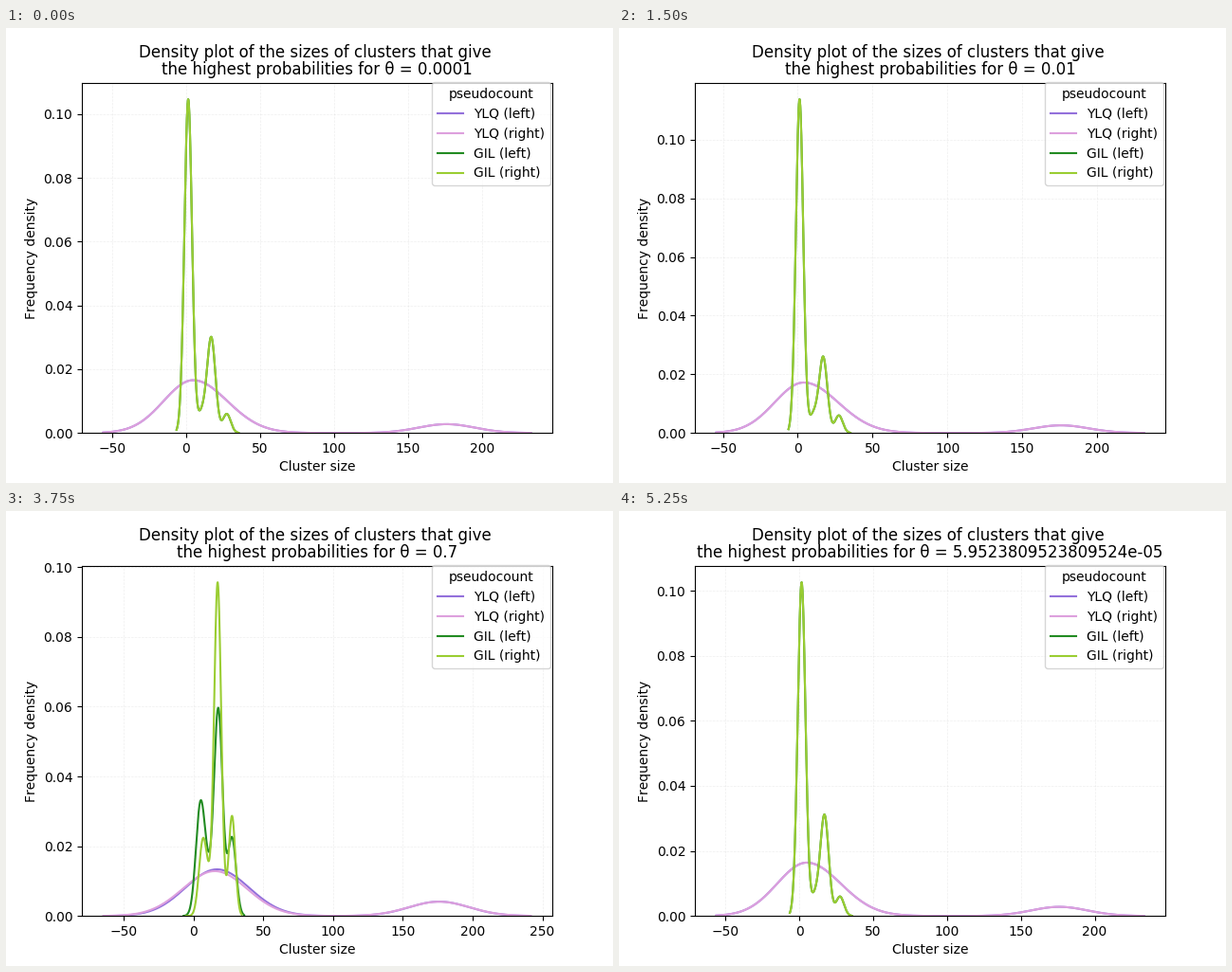
Write a matplotlib script that moves like this. It is 640 by 480 pixels and loops after 6 s.

```python
import numpy as np
import matplotlib.pyplot as plt
from matplotlib.animation import FuncAnimation

plt.rcParams["text.kerning_factor"] = 6  # whole-pixel kerning

SMALLEST = 5.9523809523809524e-05
THETAS = [0.0001, 0.001, 0.01, 0.1, 0.4, 0.7, 1, SMALLEST]

# Key poses at theta = SMALLEST, 0.01, 0.4 and 1.
# bandwidth, main peak x, main peak height, height at the largest cluster
YLQ_START = [(19.1, 5, .0164, .0028), (18.5, 4, .0172, .0026)]
YLQ_LEFT = YLQ_START + [(20.2, 13.3, .0149, .0034), (22.9, 21, .0120, .0050)]
YLQ_RIGHT = YLQ_START + [(20.3, 12.6, .0149, .0034), (23.7, 18.4, .0111, .0049)]

# bandwidth, first and second peak x, heights: peak, valley, peak, peak
GIL_START = [(2.5, 1.5, 17, .1026, .0082, .0312, .0060),
             (2.4, 1.2, 17, .1138, .0076, .0261, .0060)]
GIL_LEFT = GIL_START + [(2.9, 3.4, 17.2, .0512, .0207, .0486, .0149),
                        (2.6, 7.1, 18.1, .0214, .0168, .0734, .0345)]
GIL_RIGHT = GIL_START + [(2.7, 3.6, 17.2, .0465, .0188, .0602, .0152),
                         (2.0, 8.0, 17.2, .0174, .0150, .1117, .0355)]


def linear(u):
    return u


def ease_out(u):
    return 1 - (1 - u) ** 2


def pose(keys, theta, late=linear):
    """Blend the key poses geometrically for a given theta."""
    if theta < .01:
        stage = ease_out(np.log(theta / SMALLEST) / np.log(.01 / SMALLEST))
    elif theta < .4:
        stage = 1 + (theta - .01) / .39
    else:
        stage = 2 + late((theta - .4) / .6)
    return [np.exp(np.interp(stage, range(4), col))
            for col in np.log(keys).T]


def bell(x, centre, spread):
    return np.exp(-((x - centre) / spread) ** 2 / 2)


def ylq_curve(keys, theta):
    bw, peak, height, tail = pose(keys, theta)
    low = 1 + 2 * int(theta)
    x = np.linspace(low - 3 * bw, 176 + 3 * bw, 300)
    spread = np.where(x < peak, 1.05 * bw, max(23, 1.05 * bw))
    return x, height * bell(x, peak, spread) + tail * bell(x, 176, bw)


def gil_curve(keys, theta, late):
    bw, first, second, *heights = pose(keys, theta, late)
    x = np.linspace(1 - 3 * bw, 28 + 3 * bw, 300)
    centres = np.array([first, 10.4, second, 27.5])
    spreads = np.hypot(bw, [min(first / 2, 1.8), 1, 1.4, 1])
    # weights that make the sum pass through the wanted heights
    weights = np.linalg.solve(bell(centres[:, None], centres, spreads), heights)
    return x, bell(x[:, None], centres, spreads) @ weights


fig, ax = plt.subplots(figsize=(6.4, 4.8), dpi=100)


def draw(i):
    theta = THETAS[i]
    ax.clear()
    curves = [
        (ylq_curve(YLQ_LEFT, theta), "mediumpurple", "YLQ (left)"),
        (ylq_curve(YLQ_RIGHT, theta), "plum", "YLQ (right)"),
        (gil_curve(GIL_LEFT, theta, linear), "forestgreen", "GIL (left)"),
        (gil_curve(GIL_RIGHT, theta, ease_out), "yellowgreen", "GIL (right)"),
    ]
    for (x, y), color, label in curves:
        ax.plot(x, y, color=color, label=label)
    ax.set_ylim(0, 1.05 * max(y.max() for (_, y), *_ in curves))
    ax.grid(linestyle="--", linewidth=.5, alpha=.2)
    ax.set_xlabel("Cluster size")
    ax.set_ylabel("Frequency density")
    ax.set_title("Density plot of the sizes of clusters that give \n"
                 f"the highest probabilities for θ = {theta}",
                 linespacing=1.0)
    ax.legend(title="pseudocount", loc="upper right",
              bbox_to_anchor=(1.01, 1.02))
    return []


anim = FuncAnimation(fig, draw, frames=len(THETAS), interval=750,
                     init_func=lambda: [], repeat=True, repeat_delay=0)
plt.show()
```
